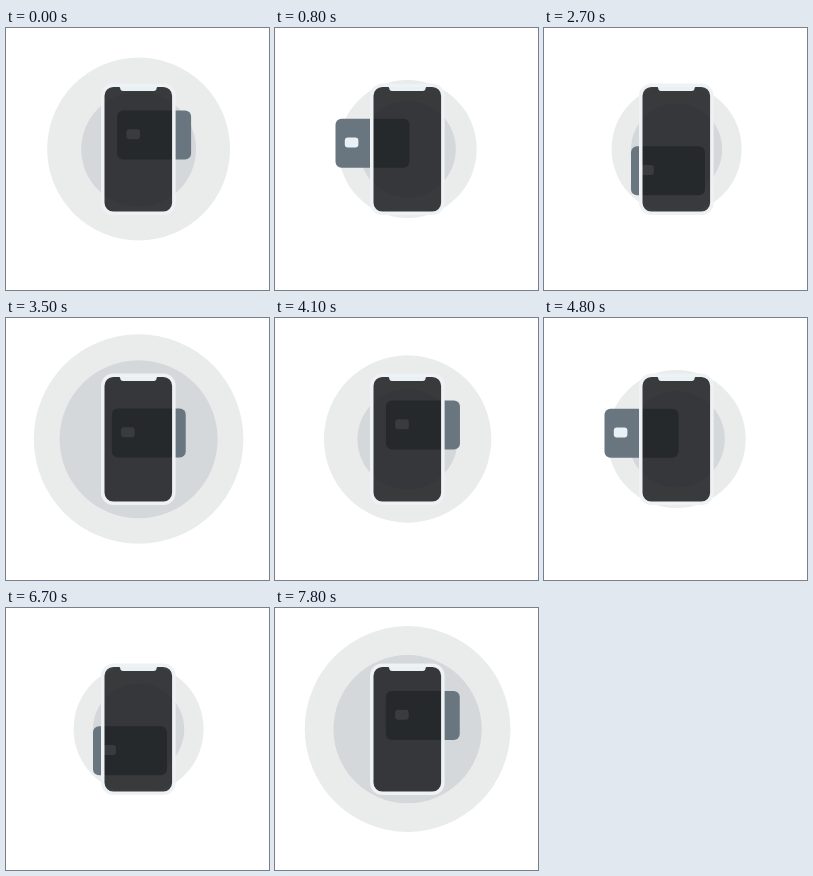
Write an HTML page that moves like this. It is 263 by 262 pixels and loops after 7.9 s.

```html
<!DOCTYPE html>
<html lang="en">
<head>
<meta charset="utf-8">
<title>Card and phone</title>
<style>
  html, body { margin: 0; height: 100%; overflow: hidden; background: #fff; }
  svg { display: block; width: 100vw; height: 100vh; }
</style>
</head>
<body>
<svg viewBox="0 0 263 262">
  <circle id="outer" cx="132.6" cy="121" fill="#eaecec"/>
  <circle id="inner" cx="132.6" cy="121.2" fill="#d4d8db"/>
  <g id="card">
    <rect width="74" height="49" rx="6" fill="#69767f"/>
    <rect x="9.3" y="18.7" width="13.6" height="10" rx="3" fill="#e9f1f6"/>
  </g>
  <!-- see-through screen, solid rim, notch -->
  <rect x="96.75" y="57.25" width="71.1" height="128" rx="10.5"
    fill="#1b1c1e" fill-opacity=".85" stroke="#eef2f5" stroke-width="3.5"/>
  <path fill="#eaf1f5" d="M112.5 58.8h39.8q-1.8.3-1.8 1.8q0 2.4-2.8 2.4h-30.6q-2.8 0-2.8-2.4q0-1.5-1.8-1.8z"/>
</svg>
<script>
  const LOOP = 7900, STEP = 100, PULSE = 2000, TRIP = 4000;
  const [outer, inner, card] = ['outer', 'inner', 'card'].map(id => document.getElementById(id));

  const sine = u => (1 - Math.cos(Math.PI * u)) / 2;
  const cubic = u => u < .5 ? 4 * u ** 3 : 1 - 4 * (1 - u) ** 3;
  const progress = (t, start, length) => Math.min(1, Math.max(0, (t - start) / length));
  const mix = (a, b, u) => a + (b - a) * u;

  // Grows for one second, then shrinks again from `fall` on
  const pulse = (t, ease, fall, length) =>
    ease(progress(t, 0, 1000)) - ease(progress(t, fall, length));

  // The card rests at three corners of a triangle in turn
  const stops = [
    { start: 0, length: 1180, x: 111.1, y: 82.5 },
    { start: 1350, length: 1300, x: 52.7, y: 92 },
    { start: 2690, length: 1310, x: 87, y: 118.3 }
  ];

  function cardAt(t) {
    const i = stops.findLastIndex(s => t >= s.start);
    const from = stops[i], to = stops[(i + 1) % stops.length];
    const u = cubic(progress(t, from.start, from.length));
    return [mix(from.x, to.x, u), mix(from.y, to.y, u)];
  }

  function draw(now) {
    const t = Math.floor(now % LOOP / STEP) * STEP;
    outer.setAttribute('r', mix(62.4, 105, pulse((t + 1460) % PULSE, sine, 1140, 840)));
    inner.setAttribute('r', mix(44.5, 79, pulse((t + 1500) % PULSE, cubic, 1000, 915)));
    card.setAttribute('transform', `translate(${cardAt(t % TRIP)})`);
    requestAnimationFrame(draw);
  }
  requestAnimationFrame(draw);
</script>
</body>
</html>
```
